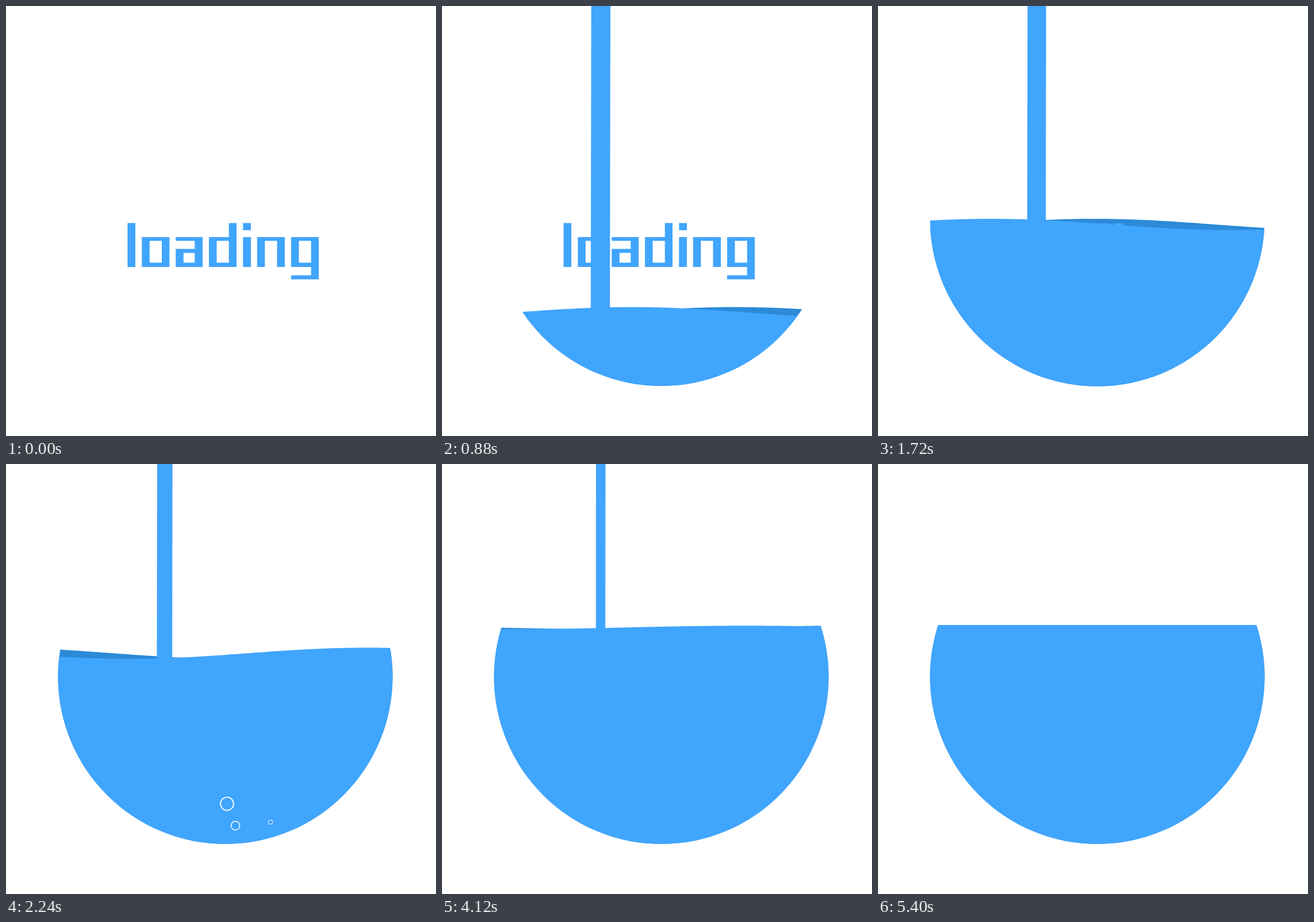
Write an HTML page with a canvas that moves like this. It is 748 px wide and 748 px high and loops after 5.8 s.

```html
<!DOCTYPE html>
<html lang="en">
<head>
<meta charset="utf-8">
<title>loading</title>
<style>
  html, body { margin: 0; width: 100%; height: 100%; overflow: hidden; background: #fff; }
  canvas { display: block; width: 748px; height: 748px; }
</style>
</head>
<body>
<canvas id="stage" width="748" height="748" role="img" aria-label="loading"></canvas>
<script>
const ctx = document.getElementById('stage').getContext('2d');
const LOOP = 5800, STEP = 40, SIZE = 748;
const BLUE = '#40a5fd', DARK = '#2c8ad8';
const BOWL = { x: 381.5, y: 370, r: 291 };
const STREAM_X = 276, GRAVITY = 0.012;
const WAVE = 830, WAVE_SPEED = 0.83, BACK_SHIFT = 180;

// [time, value] keys joined by monotone cubic curves
const LEVEL = [[440, 291], [600, 215], [800, 171], [1280, 69], [1400, 44],
  [2240, -50.5], [3200, -86], [4120, -88.7], [5400, -90]];
const SWELL = [[0, 9.7], [3550, 9.7], [3840, 6.5], [4120, 3], [4380, 1],
  [4780, 10], [4940, 12.5], [5000, 11.3], [5400, 0]];
const WIDTH = [[0, 33.3], [1500, 33.3], [2240, 26.7], [3200, 17.3], [4120, 16.5]];

// x, y at birth, drift per px risen, radius, line width, speed, birth time
const BUBBLES = [
  { x: 408.5, y: 673, drift: 0.293, r: 11.4, line: 1.9, speed: 0.2, born: 1830 },
  { x: 400.5, y: 669, drift: 0.036, r: 7.6, line: 1.5, speed: 0.42, born: 2145 },
  { x: 472, y: 665, drift: 0.286, r: 3.8, line: 1, speed: 0.385, born: 2131 }
];
const LIFE = 760, FADE = 620;

function track(keys, t) {
  const last = keys.length - 1;
  if (t <= keys[0][0]) return keys[0][1];
  if (t >= keys[last][0]) return keys[last][1];
  const slope = i => (keys[i + 1][1] - keys[i][1]) / (keys[i + 1][0] - keys[i][0]);
  const tangent = i => {
    if (i === 0) return slope(0);
    if (i === last) return slope(last - 1);
    const a = slope(i - 1), b = slope(i);
    return a * b <= 0 ? 0 : 2 * a * b / (a + b);
  };
  const i = keys.findIndex(k => k[0] > t) - 1;
  const [t0, v0] = keys[i], [t1, v1] = keys[i + 1];
  const d = t1 - t0, u = (t - t0) / d, w = 1 - u;
  return v0 * (1 + 2 * u) * w * w + v1 * u * u * (3 - 2 * u)
    + d * (tangent(i) * u * w * w - tangent(i + 1) * u * u * w);
}

// the impact pushes the bowl down, then it springs back
function bounce(t) {
  if (t < 460 || t > 2040) return 0;
  if (t < 660) return 84 * ((t - 460) / 200) ** 2;
  const s = t - 660;
  return 84 * Math.exp(-0.00345 * s) * Math.cos(0.00714 * s);
}

function surface(t, shift, drop) {
  const swell = track(SWELL, t);
  const crest = BOWL.y + drop + track(LEVEL, t);
  const trough = 14 + WAVE_SPEED * t + shift;
  return x => crest + swell * (1 + Math.cos((x - trough) * 2 * Math.PI / WAVE));
}

function clipBowl(drop) {
  ctx.beginPath();
  ctx.arc(BOWL.x, BOWL.y + drop, BOWL.r, 0, 2 * Math.PI);
  ctx.clip();
}

function water(top, color, drop) {
  ctx.save();
  clipBowl(drop);
  ctx.fillStyle = color;
  ctx.beginPath();
  ctx.moveTo(80, 800);
  for (let x = 80; x <= 684; x += 4) ctx.lineTo(x, top(x));
  ctx.lineTo(684, 800);
  ctx.fill();
  ctx.restore();
}

function word(drop) {
  const box = (l, t, r, b) => ctx.rect(l, t, r - l, b - t);
  const ring = x => {
    box(x, 402, x + 48, 454);
    box(x + 13.5, 408.5, x + 34.7, 446.5);
  };
  ctx.save();
  ctx.translate(0, drop);
  ctx.fillStyle = BLUE;
  ctx.beginPath();
  // l
  box(211.5, 377.5, 225, 454);
  // o
  ring(236.3);
  // a
  box(295.2, 402, 342, 408.5);
  box(328.3, 408.5, 342, 454);
  box(295.2, 422.5, 328.3, 454);
  box(308.8, 429.5, 328.3, 446.5);
  // d
  ring(353);
  box(387.7, 377.5, 401, 402);
  // i
  box(412.3, 377.5, 426, 390);
  box(412.3, 402, 426, 454);
  // n
  box(436.8, 402, 485, 408.5);
  box(436.8, 408.5, 450.3, 454);
  box(471.5, 408.5, 485, 454);
  // g
  ring(496);
  box(530.7, 454, 544, 475.5);
  box(496, 468.5, 530.7, 475.5);
  ctx.fill('evenodd');
  ctx.restore();
}

function stream(t, top, drop) {
  if (t < 240) return;
  const fall = start => GRAVITY * Math.max(0, t - start) ** 2;
  const floor = BOWL.y + drop + Math.sqrt(BOWL.r ** 2 - (BOWL.x - STREAM_X) ** 2);
  const head = Math.min(fall(230), top(STREAM_X) + 2, floor);
  const tail = fall(4355);
  if (tail >= head) return;
  const half = track(WIDTH, t) / 2;
  const lean = y => STREAM_X + (0.3 - y / 600) * half / 16.6;
  ctx.fillStyle = BLUE;
  ctx.beginPath();
  ctx.moveTo(lean(tail) - half, tail);
  ctx.lineTo(lean(tail) + half, tail);
  ctx.lineTo(lean(head) + half, head);
  ctx.lineTo(lean(head) - half, head);
  ctx.fill();
}

function bubbles(t, drop) {
  ctx.save();
  clipBowl(drop);
  ctx.strokeStyle = '#fff';
  for (const b of BUBBLES) {
    const age = t - b.born;
    if (age < 0 || age >= 2 * LIFE) continue;
    const a = age % LIFE, rise = a * b.speed;
    ctx.globalAlpha = Math.min(1, (LIFE - a) / (LIFE - FADE));
    ctx.lineWidth = b.line;
    ctx.beginPath();
    ctx.arc(b.x - rise * b.drift, b.y - rise, b.r, 0, 2 * Math.PI);
    ctx.stroke();
  }
  ctx.restore();
}

function draw(t) {
  const drop = bounce(t);
  const back = surface(t, BACK_SHIFT, drop);
  const front = surface(t, 0, drop);
  ctx.fillStyle = '#fff';
  ctx.fillRect(0, 0, SIZE, SIZE);
  if (t > 440) water(back, DARK, drop);
  word(drop);
  stream(t, front, drop);
  if (t > 440) water(front, BLUE, drop);
  bubbles(t, drop);
}

const begin = performance.now();
function tick() {
  const t = (performance.now() - begin) % LOOP;
  draw(Math.floor(t / STEP) * STEP);
  requestAnimationFrame(tick);
}
tick();
</script>
</body>
</html>
```
